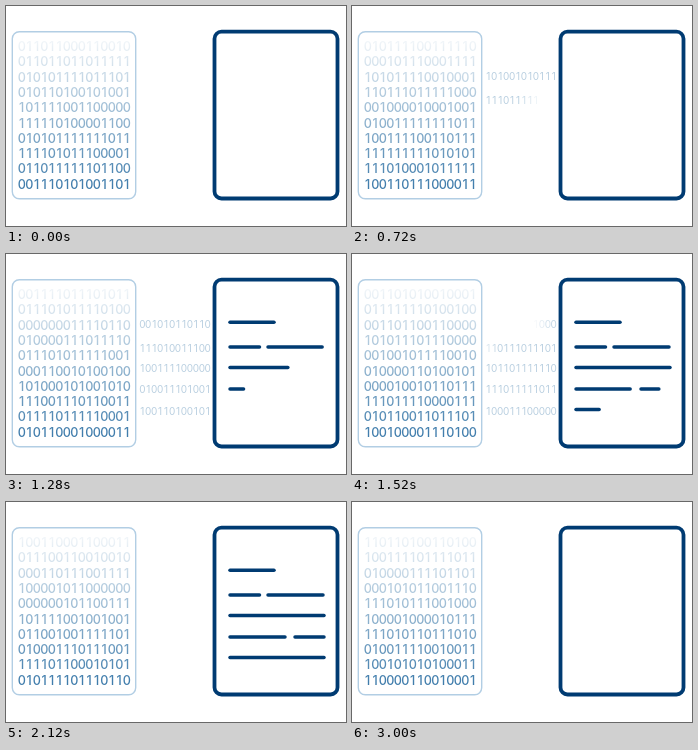
Animation, 340 px wide and 220 px high, one loop 3040 ms. Source, as an HTML page with a canvas:

```html
<!DOCTYPE html>
<html lang="en">
<head>
<meta charset="utf-8">
<title>Binary to document</title>
<style>
  html, body { margin: 0; width: 100%; height: 100%; overflow: hidden; background: #fff; }
  canvas { display: block; }
</style>
</head>
<body>
<canvas id="stage" width="340" height="220"></canvas>
<script>
const ctx = document.getElementById('stage').getContext('2d');
const LOOP = 3040, STEP = 40;
const NAVY = '#003b72', BLUE = '60,122,170';

// Stream rows between the sheets: vertical centres
const streamY = [70, 94, 114, 135, 157];
// Document lines in drawing order: [x1, x2, y]
const lines = [
  [224, 268, 68.3], [224, 253.5, 93], [262, 317, 93], [224, 318, 113.5],
  [224, 279, 135], [289, 318, 135], [224, 318, 155.5]
];

const clamp = v => Math.max(0, Math.min(1, v));
const progress = (t, start, length) => clamp((t - start) / length);

// Repeatable 0 or 1 for a given frame, row and column
function bit(frame, row, col) {
  let h = Math.imul(frame + 1, 73856093) ^ Math.imul(row + 1, 19349663) ^ Math.imul(col + 1, 83492791);
  h = Math.imul(h ^ (h >>> 15), 0x2c1b3c6d);
  h = Math.imul(h ^ (h >>> 13), 0x297a2d39);
  return ((h ^ (h >>> 16)) >>> 0) % 100 < 54 ? '1' : '0';
}

function sheet(x, y, w, h, color, weight) {
  ctx.strokeStyle = color;
  ctx.lineWidth = weight;
  ctx.beginPath();
  ctx.roundRect(x, y, w, h, 7);
  ctx.stroke();
}

const fade = ctx.createLinearGradient(0, 33, 0, 184);
fade.addColorStop(0, `rgba(${BLUE},0.06)`);
fade.addColorStop(1, `rgba(${BLUE},1)`);

function drawBlock(frame) {
  ctx.font = '500 12.6px Inter, sans-serif';
  ctx.fillStyle = fade;
  for (let row = 0; row < 10; row++)
    for (let col = 0; col < 15; col++)
      ctx.fillText(bit(frame, row, col), 15.7 + col * 7.5, 45 + row * 15.3);
}

function drawStream(frame, t) {
  ctx.font = '10px Inter, sans-serif';
  ctx.fillStyle = `rgb(${BLUE})`;
  streamY.forEach((y, row) => {
    // Both wipes have a soft edge four digits wide
    const enter = progress(t, 488 + row * 120, 200) * 16;
    const leave = progress(t, 1616 + (row - 2) * 120, 200) * 16;
    for (let col = 0; col < 12; col++) {
      ctx.globalAlpha = 0.36 * clamp((enter - col) / 4) * (1 - clamp((leave - col) / 4));
      ctx.fillText(bit(frame, row + 10, col), 136.3 + col * 5.95, y + 3.7);
    }
  });
  ctx.globalAlpha = 1;
}

function lineColor(t) {
  const p = progress(t, 2400, 400);
  const stops = [[0, 59, 114], [135, 175, 209], [255, 255, 255]];
  const i = p < 0.5 ? 0 : 1, k = p * 2 - i;
  return `rgb(${stops[i].map((c, n) => c + (stops[i + 1][n] - c) * k)})`;
}

function drawLines(t) {
  if (t >= 2800) return;
  ctx.strokeStyle = lineColor(t);
  ctx.lineWidth = 3.5;
  ctx.lineCap = 'round';
  lines.forEach(([x1, x2, y], i) => {
    const p = progress(t, 720 + i * 120, 325);
    if (!p) return;
    ctx.beginPath();
    ctx.moveTo(x1, y);
    ctx.lineTo(x1 + (x2 - x1) * p, y);
    ctx.stroke();
  });
}

function draw(now) {
  const frame = Math.floor((now % LOOP) / STEP), t = frame * STEP;
  ctx.fillStyle = '#fff';
  ctx.fillRect(0, 0, 340, 220);
  ctx.textAlign = 'center';
  sheet(6.3, 25.8, 123.4, 167, '#b2cee4', 1.4);
  sheet(208.5, 25.7, 123, 166.8, NAVY, 3.8);
  drawBlock(frame);
  drawStream(frame, t);
  drawLines(t);
}

const begin = performance.now();
function tick() {
  draw(performance.now() - begin);
  requestAnimationFrame(tick);
}
tick();
</script>
</body>
</html>
```
